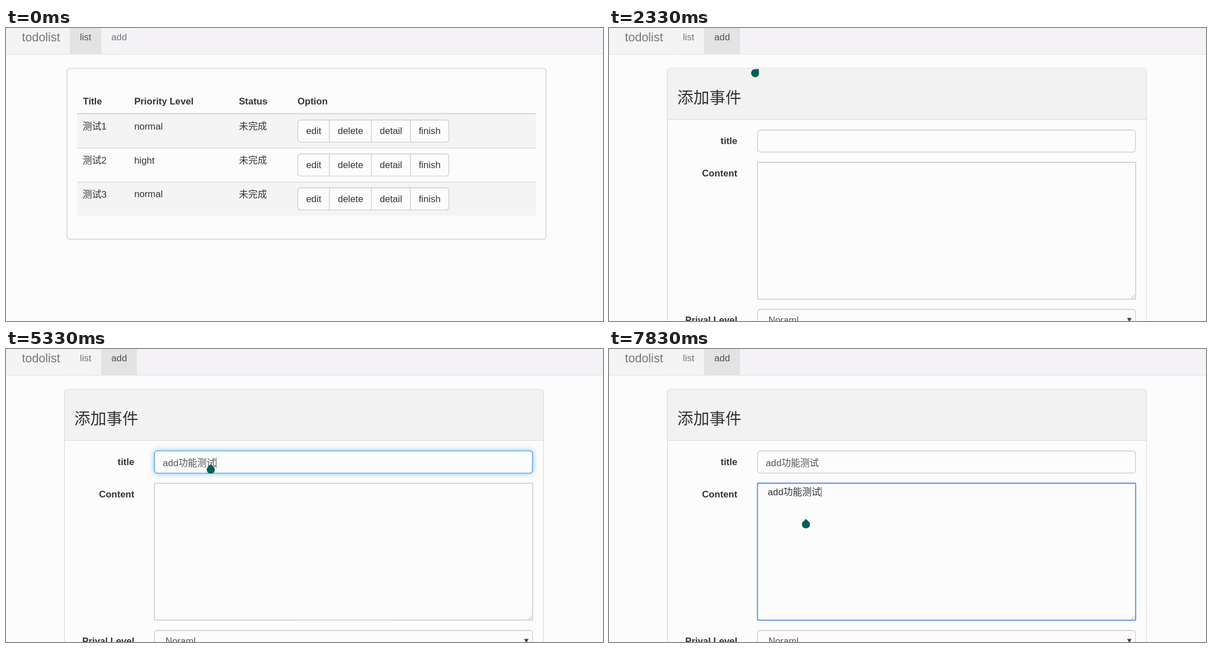
An HTML page with a canvas for the animation above (8000 ms loop, 1067 by 525 pixels).

```html
<!DOCTYPE html>
<html lang="en">
<head>
<meta charset="utf-8">
<title>Todo list</title>
<style>
html, body { margin: 0; width: 100%; height: 100%; overflow: hidden; background: #fcfcfc; }
canvas { display: block; width: 1067px; height: 525px; }
</style>
</head>
<body>
<canvas id="stage" width="1067" height="525"></canvas>
<script>
const ctx = document.getElementById('stage').getContext('2d');
const SANS = '"Liberation Sans", "Noto Sans CJK SC", "Noto Sans CJK", sans-serif';
const CJK = '"Noto Sans CJK SC", "Noto Sans CJK", sans-serif';
const SMALL = '"Open Sans", "Noto Sans CJK SC", sans-serif';
const LOOP = 8000, STEP = 1000 / 6;
const SIZE = 16.73;
const TITLE = 'add功能测试';

// Pointer path: [step, x, y]
const PATH = [
  [1, 470, 374], [4, 768, 345], [5, 763, 276], [6, 756, 275], [7, 746, 213],
  [8, 520, 120], [9, 300, 48], [10, 220, 22], [12, 222, 23], [14, 262, 80],
  [17, 366, 215], [33, 366, 215], [35, 384, 234], [36, 383, 218], [37, 376, 215],
  [41, 280, 219], [42, 260, 221], [43, 275, 232], [46, 352, 313], [47, 352, 313]
];

// Typing in the title field: [step, committed, composing, shown in the input method, candidates]
const TYPING = [
  [17, '', ''],
  [19, '', 'a', 'a', ['啊']],
  [21, '', 'ad', "a'd", ['阿弟', '阿斗', '阿大', '爱的', '安定']],
  [22, '', 'add', "a'd'd", ['阿弟', '爱的', '安定', '阿大', '阿斗']],
  [24, 'add', ''],
  [26, 'add', 'g', 'g', ['个', '给', '跟', '过', '高']],
  [27, 'add', 'gs', "g's", ['公司', '告诉', '故事', '感受', '工商']],
  [28, 'add', 'gsn', "gs'n", ['功能', '工农', '供暖', '公牛', '供你']],
  [29, 'add功能', ''],
  [30, 'add功能', 'c', 'c', ['从', '才', '次', '错', '除']],
  [31, 'add功能', 'cs', "c's", ['测试', '城市', '产生', '措施', '从事']],
  [32, TITLE, '']
];

function text(str, x, y, color = '#333', size = SIZE, weight = '', align = 'left', family = SANS) {
  ctx.font = `${weight} ${size}px ${family}`;
  ctx.textAlign = align;
  ctx.fillStyle = color;
  ctx.fillText(str, x, y);
}

function widthOf(str, size = SIZE, weight = '') {
  ctx.font = `${weight} ${size}px ${SANS}`;
  return ctx.measureText(str).width;
}

function fill(x, y, w, h, color) {
  ctx.fillStyle = color;
  ctx.fillRect(x, y, w, h);
}

function box(x, y, w, h, r, stroke, back, line = 1.2) {
  ctx.beginPath();
  ctx.roundRect(x, y, w, h, r);
  if (back) { ctx.fillStyle = back; ctx.fill(); }
  ctx.strokeStyle = stroke;
  ctx.lineWidth = line;
  ctx.stroke();
}

function shadowed(color, blur, dy, draw) {
  ctx.save();
  ctx.shadowColor = color;
  ctx.shadowBlur = blur;
  ctx.shadowOffsetY = dy;
  draw();
  ctx.restore();
}

function pointerAt(step) {
  const k = PATH.findIndex(p => p[0] >= step);
  const b = PATH[k], a = PATH[Math.max(0, k - 1)];
  const f = b === a ? 0 : (step - a[0]) / (b[0] - a[0]);
  return { x: a[1] + (b[1] - a[1]) * f, y: a[2] + (b[2] - a[2]) * f };
}

function drawNav(active, hoverAdd) {
  const back = ctx.createLinearGradient(0, 0, 1067, 0);
  back.addColorStop(0, '#f4f4f4');
  back.addColorStop(0.09, '#f4f4f4');
  back.addColorStop(0.25, '#f4f2f7');
  back.addColorStop(1, '#f4f2f7');
  fill(0, 0, 1067, 47, back);
  fill(0, 46.4, 1067, 1.2, '#e4e4e4');
  if (active === 'list') fill(114, 0, 56.5, 47, '#e4e3e4');
  else fill(170, 0, 64, 47, '#e4e3e4');
  text('todolist', 28.5, 24, '#777', 21.5);
  text('list', 132, 22, active === 'list' ? '#555' : '#777');
  text('add', 188.3, 22, active === 'add' || hoverAdd ? '#505050' : '#777');
}

function drawList() {
  shadowed('rgba(0,0,0,.1)', 2, 1, () => box(109.2, 72, 856, 306, 5, '#d9d9d9', '#fcfcfc'));
  const columns = [137.5, 229.2, 416.2, 521];
  ['Title', 'Priority Level', 'Status', 'Option'].forEach((s, i) => text(s, columns[i], 136.5, '#333', SIZE, 'bold'));
  fill(127, 152.4, 820, 2.3, '#d8d8d8');
  ['normal', 'hight', 'normal'].forEach((level, i) => {
    const y = 154.3 + i * 60.75;
    if (i % 2 === 0) fill(127, y + 0.5, 820, 60, '#f4f4f4');
    if (i) fill(127, y - 0.4, 820, 1.2, '#d8d8d8');
    text('测试' + (i + 1), 137, y + 27.7);
    text(level, 229.2, y + 27.5);
    text('未完成', 416.2, y + 27.7);
    box(521.5, y + 10.6, 270, 39.6, 5, '#c8c8c8', '#fcfcfc');
    [578, 653, 722.8].forEach(x => fill(x - 0.6, y + 10.6, 1.2, 39.6, '#c8c8c8'));
    ['edit', 'delete', 'detail', 'finish'].forEach((s, n) => text(s, [536.5, 593, 668, 737.7][n], y + 36));
  });
}

function drawInput(y, focused) {
  const edge = focused ? '#66a9e4' : '#c8c8c8';
  if (focused) shadowed('rgba(102,175,233,.7)', 10, 0, () => box(265.4, y, 675.6, 39.8, 5, edge, '#fcfcfc'));
  box(265.4, y, 675.6, 39.8, 5, edge, '#fcfcfc', focused ? 1.5 : 1.2);
  if (!focused) fill(268, y + 0.8, 670, 1, 'rgba(0,0,0,.06)');
}

function drawForm(step) {
  const titleFocus = step >= 17 && step < 45, contentFocus = step >= 45;
  box(104.5, 72, 856, 520, 5, '#d9d9d9', '#fcfcfc');
  ctx.beginPath();
  ctx.roundRect(105.1, 72.6, 854.8, 90.8, [4, 4, 0, 0]);
  ctx.fillStyle = '#f2f2f2';
  ctx.fill();
  fill(104.5, 163, 856, 1.2, '#d9d9d9');
  text('添加事件', 122, 134.5, '#333', 28.7);
  [['title', 208], ['Content', 266], ['Prival Level', 528.5]].forEach(([s, y]) => text(s, 229.3, y, '#333', SIZE, 'bold', 'right'));

  drawInput(182.6, titleFocus);
  box(265.3, 240.5, 676, 245.3, contentFocus ? 1 : 0, contentFocus ? '#4f8ce0' : '#b2b2b2', '#fcfcfc', contentFocus ? 1.8 : 1);
  ctx.strokeStyle = '#999';
  ctx.lineWidth = 0.8;
  ctx.beginPath();
  [7, 3].forEach(d => { ctx.moveTo(940 - d, 484.5); ctx.lineTo(940, 484.5 - d); });
  ctx.stroke();

  drawInput(504.2, false);
  text('Noraml', 285, 528.5, '#555');
  ctx.beginPath();
  ctx.moveTo(926, 519.5);
  ctx.lineTo(934, 519.5);
  ctx.lineTo(930, 527);
  ctx.fillStyle = '#444';
  ctx.fill();
}

function drawSuggestions(items) {
  const h = 9.5 + items.length * 21.5;
  shadowed('rgba(0,0,0,.35)', 3, 1, () => box(264.5, 223, 114.5, h, 1, '#ddd', '#fdfdfd', 0.8));
  items.forEach((s, i) => text(s, 271.5, 241 + i * 21.5, '#333', 7.8, '', 'left', SMALL));
}

function drawInputMethod(x, shown, candidates) {
  const single = candidates.length === 1;
  const width = single ? 106 : candidates[0].length === 1 ? 171 : 221;
  const pitch = candidates[0].length === 1 ? 26.5 : 36.3;
  box(x + 0.3, 211.5, width, 32.7, 0, '#bcbcbc', '#fdfdfd', 1);
  fill(x + 1, 227, width - 2, 0.8, '#dedede');
  text(shown, x + 6, 223.2, '#1763b0', 9.8, 'bold');
  fill(x + 7 + widthOf(shown, 9.8, 'bold'), 214.5, 1, 11, '#b5604e');
  candidates.forEach((s, i) => {
    const label = single ? s : `${i + 1}.${s}`;
    text(label, x + 6 + i * pitch, 239.7, i ? '#2d83ae' : '#b5524a', 9.8, single ? 'bold' : '', 'left', CJK);
  });
  ctx.lineWidth = 1.1;
  [-1, 1].forEach(dir => {
    const ax = x + width + (dir < 0 ? -26.5 : -20);
    ctx.strokeStyle = dir > 0 && !single ? '#e0825a' : '#c9c9c9';
    ctx.beginPath();
    ctx.moveTo(ax - dir * 1.4, 233.2);
    ctx.lineTo(ax + dir * 1.4, 236);
    ctx.lineTo(ax - dir * 1.4, 238.8);
    ctx.stroke();
  });
  fill(x + width - 18, 212, 18, 18, '#f0ad8a');
}

function drawTitleText(step, pointer) {
  const state = TYPING.findLast(s => s[0] <= step);
  if (!state) return;
  const [, done, composing, shown, candidates] = state;
  const hasCjk = done.length > 3;
  const base = hasCjk ? 209.7 : 208;
  const start = 280.3 + widthOf(done);
  const end = start + widthOf(composing);
  text(done + composing, 280.3, base, '#555');

  if (step >= 37 && step < 45) {
    const from = step >= 42 ? 280 : Math.max(280, pointer.x);
    ctx.save();
    ctx.beginPath();
    ctx.rect(from, 194, Math.max(0, 375.7 - from), 19.3);
    ctx.clip();
    fill(280, 194, 96, 20, '#338ffb');
    text(done, 280.3, base, '#fff');
    ctx.restore();
  } else if (step < 45) {
    fill(end, base - 15, 1, 18.5, '#444');
  }

  if (step >= 19 && step < 26) {
    const all = ['add', 'add22', 'add测试', 'asd', 'asdasda'];
    drawSuggestions(all.filter(s => s.startsWith(done + composing)));
  }
  if (composing) {
    fill(start, 209, end - start, 1.2, '#333');
    drawInputMethod(Math.round(start), shown, candidates);
  }
}

function drawDrop({ x, y }, tilt) {
  ctx.save();
  ctx.translate(x, y);
  ctx.rotate(tilt);
  ctx.beginPath();
  ctx.moveTo(0, -9);
  ctx.bezierCurveTo(2, -5.5, 7.2, -3.5, 7.2, 1.2);
  ctx.bezierCurveTo(7.2, 5.5, 4, 8.3, 0, 8.3);
  ctx.bezierCurveTo(-4, 8.3, -7.2, 5.5, -7.2, 1.2);
  ctx.bezierCurveTo(-7.2, -3.5, -2, -5.5, 0, -9);
  ctx.fillStyle = '#075c53';
  ctx.fill();
  ctx.restore();
}

function drawHand({ x, y }) {
  ctx.save();
  ctx.translate(x, y);
  fill(-2, -9, 4.2, 5, '#5f8ca3');
  const outline = new Path2D('M-3-5Q-1.5-7 0-5V-1Q2-2 3 0Q5-1 6 1Q7 0 7 3V6Q6 9 3 9H-1Q-3 8-4 5L-7 2Q-6 0-3 2Z');
  ctx.fillStyle = '#fdfdfd';
  ctx.fill(outline);
  ctx.strokeStyle = '#a9a9ad';
  ctx.lineWidth = 0.9;
  ctx.stroke(outline);
  ctx.restore();
}

function drawPointer(step, pointer) {
  if (step < 1) return;
  if (step >= 10 && step <= 12) return drawHand(pointer);
  const dx = pointer.x - pointerAt(Math.max(1, step - 1)).x;
  const tilt = Math.max(-40, Math.min(40, dx * 2)) * Math.PI / 180;
  drawDrop(pointer, tilt);
}

function render(time) {
  const step = Math.min(47, Math.floor((time % LOOP + 5) / STEP));
  const pointer = pointerAt(step);
  fill(0, 0, 1067, 525, '#fcfcfc');
  if (step < 12) {
    drawNav('list', step >= 10);
    drawList();
  } else {
    drawNav('add');
    drawForm(step);
    drawTitleText(step, pointer);
    if (step === 47) text(TITLE, 283.8, 261.5);
    if (step >= 45) fill(step === 47 ? 378.8 : 284, 247, 1, 18.5, '#555');
  }
  drawPointer(step, pointer);
}

const begin = performance.now();
function tick() {
  render(performance.now() - begin);
  requestAnimationFrame(tick);
}
tick();
</script>
</body>
</html>
```
